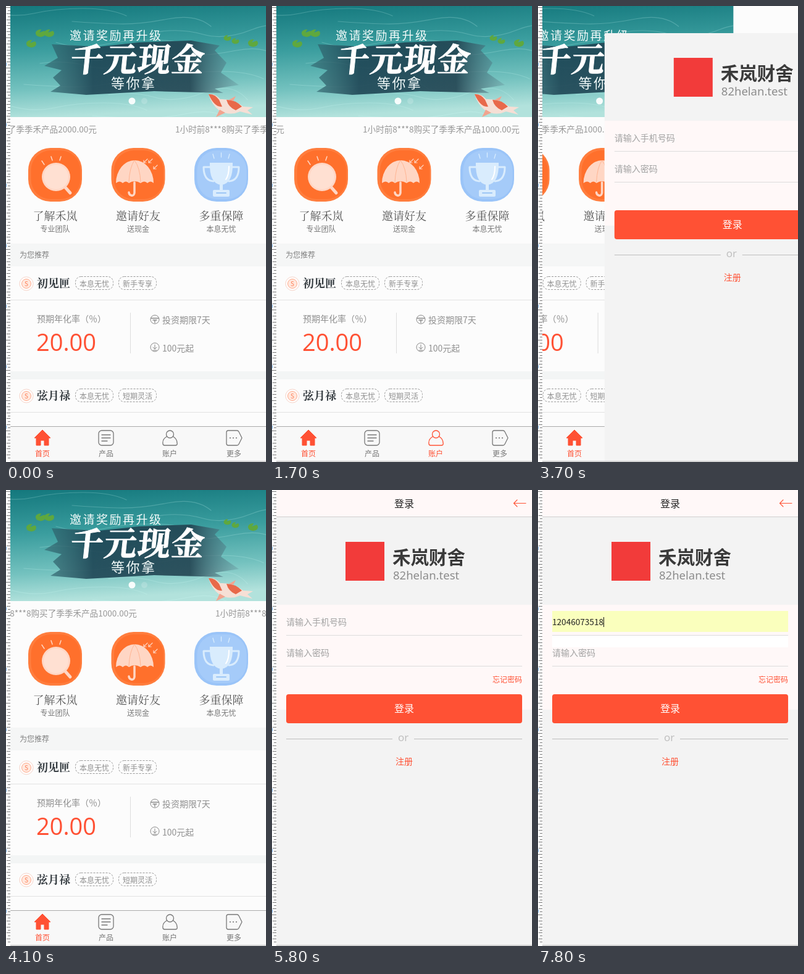
Write an HTML page that moves like this. It is 421 px wide and 739 px high and loops after 8 s.

```html
<!DOCTYPE html>
<html lang="zh-CN">
<head>
<meta charset="utf-8">
<style>
html, body { margin: 0; width: 100%; height: 100%; overflow: hidden; background: #fcfcfc; }
svg { display: block; width: 100%; height: 100%; }
text { font-family: "Noto Sans CJK SC", "Noto Sans", sans-serif; white-space: pre; }
.serif { font-family: "Noto Serif CJK SC", "Noto Sans CJK SC", serif; }
.num { font-family: "Open Sans", "Noto Sans", sans-serif; }
.mid { text-anchor: middle; }
</style>
</head>
<body>
<svg id="stage" viewBox="0 0 421 739"></svg>
<script>
const RED = '#ff5134', GREY = '#8f8f8f', PEACH = '#ffd6c4', ICE = '#d9ecfd';

const text = (x, y, size, fill, str, more = '') =>
  `<text x="${x}" y="${y}" font-size="${size}" fill="${fill}" ${more}>${str}</text>`;
const rect = (x, y, w, h, fill, more = '') =>
  `<rect x="${x}" y="${y}" width="${w}" height="${h}" fill="${fill}" ${more}/>`;
const path = (d, fill, more = '') => `<path d="${d}" fill="${fill}" ${more}/>`;
const line = (d, color, w = 1, more = '') =>
  path(d, 'none', `stroke="${color}" stroke-width="${w}" stroke-linecap="round" stroke-linejoin="round" ${more}`);
const circle = (x, y, r, fill, more = '') => `<circle cx="${x}" cy="${y}" r="${r}" fill="${fill}" ${more}/>`;
const group = (id, body) => `<g id="${id}">${body}</g>`;
const range = (n, fn) => Array.from({ length: n }, (_, i) => fn(i)).join('');

const defs = `<defs>
  <linearGradient id="water" x1="0" y1="0" x2=".12" y2="1">
    <stop offset="0" stop-color="#14787d"/><stop offset=".4" stop-color="#3a9d9e"/>
    <stop offset=".75" stop-color="#74c2bf"/><stop offset="1" stop-color="#b2e2dc"/>
  </linearGradient>
  <linearGradient id="ink">
    <stop offset="0" stop-color="#33666f" stop-opacity=".7"/><stop offset=".25" stop-color="#1c4252"/>
    <stop offset=".75" stop-color="#21414f"/><stop offset="1" stop-color="#5b7f8a" stop-opacity=".3"/>
  </linearGradient>
  <clipPath id="page"><rect x="7" y="0" width="414" height="739"/></clipPath>
  <clipPath id="sea"><rect x="7" y="0" width="414" height="180"/></clipPath>
</defs>`;

function ruler() {
  return rect(0, 0, 7, 739, '#fff') + range(150, i => {
    const y = i * 4.9 + 2, len = i % 10 === 0 ? 7 : i % 2 ? 4 : 6;
    return rect(7 - len, Math.round(y), len, 1, '#777');
  }) + range(7, i => rect(0, 92 + i * 98, 1, 5, '#7db4e8'));
}

function lily(x, y, r) {
  return path(`M${x} ${y}L${x + r} ${y - r * .35}A${r} ${r * .75} 0 1 1 ${x + r * .4} ${y - r * .6}Z`, '#5fa83e');
}

function banner() {
  const ripples = range(11, i => {
    const y = 8 + i * 17, x = (i * 137) % 300 - 30;
    return line(`M${x} ${y}q40 ${12 - i % 3 * 9} 75 4t80 -8t70 12`, '#d5fff8', 1.2, 'opacity=".22"');
  });
  const koi = path('M328 143Q338 141 347 151Q368 150 384 163L400 164L391 169L399 176L379 171Q362 179 345 169Q333 160 328 143Z', '#f6dfd5')
    + path('M328 143Q338 142 345 152L350 163Q338 165 328 143Z', '#e8694a')
    + path('M357 152Q372 152 382 163L372 169Q360 164 357 152Z', '#e8694a')
    + path('M346 168L340 180L355 173ZM361 152L372 146L368 154Z', '#f1a48f');
  return '<g clip-path="url(#sea)">' + rect(7, 0, 414, 180, 'url(#water)') + ripples
    + lily(39, 60, 8) + lily(54, 43, 8) + lily(68, 43, 8) + lily(357, 51, 6) + lily(370, 56, 6) + lily(398, 59, 8)
    + path('M74 62L150 66L215 59L300 56L346 64L338 72L357 92L348 108L377 128L338 134L352 141L240 138L130 144L72 139L88 129L76 116L90 104L62 97L84 84Z', 'url(#ink)', 'opacity=".88"')
    + koi
    + text(103, 55, 19, '#f3fbfa', '邀请奖励再升级', 'letter-spacing="2.5"')
    + text(105, 106, 53, '#fff', '千元现金', 'class="serif" font-weight="900" letter-spacing="1.5" stroke="#fff" transform="translate(9 0) skewX(-6)"')
    + text(170, 133, 22, '#f3fbfa', '等你拿', 'letter-spacing="2.5"')
    + circle(204, 154, 5.5, '#fff', 'opacity=".92"') + circle(224, 154, 5, '#fff', 'opacity=".18"') + '</g>';
}

function badge(cx, outer, inner, art, title, sub) {
  return rect(cx - 43.5, 230, 87, 87, outer, 'rx="36"') + rect(cx - 39, 234, 80, 79, inner, 'rx="32"') + art
    + text(cx, 347, 18, '#555', title, 'class="serif mid"') + text(cx, 366, 12, '#777', sub, 'class="mid"');
}

function badges() {
  const glass = line('M96 294L104 303', PEACH, 5) + circle(81, 277, 23, PEACH)
    + circle(81, 277, 20, '#ffe0d2') + line('M58 251L62 257M73 244L75 250M89 244L87 250', PEACH, 1.5);
  const umbrella = path('M178 287A30.5 37 0 0 1 239 287Q234 282 229 287Q224 282 218 287Q208 281 199 287Q194 282 189 287Q184 282 178 287Z', PEACH)
    + line('M208 286V303Q207 308 203 307Q199 306 199 302', PEACH, 3.5)
    + line('M199 285Q200 262 208 250Q217 262 218 285', '#ffb593', 1)
    + range(3, i => {
      const x = 223 + i * 8, y = i === 2 ? 264 : 254;
      return line(`M${x + 6} ${y - 6}L${x} ${y}M${x} ${y - 4}V${y}H${x + 4}`, PEACH, 1.2);
    });
  const cup = line('M331 261H320Q320 283 336 284M366 261H377Q377 283 361 284', ICE, 3)
    + path('M330 254H367Q368 288 348.5 290Q329 288 330 254Z', ICE)
    + rect(346, 288, 5, 11, ICE) + rect(335, 298, 27, 11, ICE, 'rx="2"')
    + line('M341 303H356', '#9cc6f5', 2) + line('M361 260Q361 274 356 281', '#fff', 2)
    + line('M335 240L337 247M348.5 238V245M362 240L360 247', ICE, 1.3);
  return badge(79.5, '#ff7d3d', '#ff702c', glass, '了解禾岚', '专业团队')
    + badge(214, '#ff7d3d', '#ff702c', umbrella, '邀请好友', '送现金')
    + badge(348.5, '#9ac4f8', '#a5cbf9', cup, '多重保障', '本息无忧');
}

function pill(x, y, str) {
  return rect(x + .5, y - 11.5, 61, 21, 'none', 'rx="9" stroke="#999" stroke-dasharray="3 2"')
    + text(x + 31, y + 5, 12, GREY, str, 'class="mid"');
}

function product(y, name, tag) {
  return circle(33, y, 11, '#fff', 'stroke="#f6d3c8"') + circle(33, y, 7.5, '#ffe9df', 'stroke="#ffa98b"')
    + text(33, y + 4, 10, '#ff7f57', 'S', 'class="mid"')
    + text(50, y + 6, 18, '#333a3f', name, 'class="serif" font-weight="700"')
    + pill(112, y, '本息无忧') + pill(182, y, tag) + rect(7, y + 26, 414, 1, '#e2e2e2');
}

function tab(cx, label, icon, id, color = '#777') {
  return `<g id="${id}" color="${color}">${icon}${text(cx, 730, 12, 'currentColor', label, 'class="mid"')}</g>`;
}

function tabs() {
  const cc = 'currentColor';
  return rect(7, 682, 414, 55, '#f8f8f8') + rect(7, 681, 414, 1, '#aaa')
    + tab(59, '首页', path('M59 687L72 700H69V712H62V704H56V712H49V700H46Z', cc, 'stroke="currentColor" stroke-linejoin="round"'), 'home-tab', RED)
    + tab(162, '产品', rect(150, 688, 24, 24, 'none', 'rx="5" stroke="currentColor" stroke-width="1.3"')
      + line('M155 695H169M155 700H169M155 705H164', cc, 1.3), 'product-tab')
    + tab(265, '账户', circle(265.5, 694, 6, 'none', 'stroke="currentColor" stroke-width="1.3"')
      + line('M260 698Q253 702 254 709Q254 712 257 712H274Q278 712 277 708Q277 702 271 698', cc, 1.3), 'account-tab')
    + tab(369, '更多', line('M360 688H374Q376 688 377 690L382 700L377 710Q376 712 374 712H360Q357 712 357 709V691Q357 688 360 688Z', cc, 1.3)
      + range(3, i => circle(363 + i * 5, 700, 1.1, cc)), 'more-tab');
}

function home() {
  return rect(7, 0, 414, 739, '#fcfcfc') + banner()
    + `<g clip-path="url(#page)">${group('ticker', '')}</g>` + badges()
    + rect(7, 385, 414, 37, '#f5f6f6') + text(22, 408, 12, '#808080', '为您推荐')
    + product(450, '初见匣', '新手专享')
    + text(50, 512, 14, GREY, '预期年化率（％）') + text(49, 559, 38, RED, '20.00', 'class="num"')
    + rect(201, 497, 1, 66, '#ddd')
    + circle(241, 508, 7, 'none', 'stroke="#888"') + line('M235 506H247M238 509H244M241 509V513', '#888', 1.4)
    + text(253, 514, 14, GREY, '投资期限7天')
    + circle(241, 553, 7, 'none', 'stroke="#888"') + line('M241 549V556M238 553L241 556L244 553M238 558H244', '#888')
    + text(253, 560, 14, GREY, '100元起')
    + rect(7, 592, 414, 13, '#f3f5f5') + product(632, '弦月禄', '短期灵活');
}

const PHONE = '12046073518';
const saved = [PHONE, '12046073529', '12088240160', '12071936604', '12059320847', '12093415072'];

function bar() {
  return rect(7, 0, 414, 43, '#fbfbfb', 'class="panel"') + rect(7, 43, 414, 1, '#d0d0d0')
    + group('title', text(214, 28, 16, '#222', '登录', 'class="mid"'))
    + line('M411 21.5H391.5L397 16M391.5 21.5L397 27', RED, 1.1);
}

function form() {
  return rect(7, 44, 414, 695, '#f3f3f3')
    + rect(119, 84, 63, 63, '#f23b3a')
    + text(195, 120, 29.5, '#3a3a3a', '禾岚财舍', 'font-weight="700"')
    + text(196, 145, 18.5, '#8c8c8c', '82helan.test', 'style="font-family:\'Noto Sans\',sans-serif"')
    + rect(7, 186, 414, 170, '#fcfcfc', 'class="panel"')
    + rect(23, 236, 382, 19, '#fff', 'id="strip"')
    + rect(23, 196, 382, 34, '#faffbd', 'id="fill"')
    + text(23, 219, 14, '#a2a2a2', '请输入手机号码', 'id="hint"')
    + text(23, 219, 13.6, '#222', '', 'id="typed"') + rect(23, 206, 1, 16, '#111', 'id="caret"')
    + rect(23, 235, 382, 1, '#dcdcdc') + text(23, 269, 14, '#a2a2a2', '请输入密码') + rect(23, 285, 382, 1, '#dcdcdc')
    + text(357, 312, 12, RED, '忘记密码')
    + rect(23, 331, 382, 47, RED, 'rx="4"') + text(214, 360, 16, '#fff', '登录', 'class="mid"')
    + rect(23, 403, 172, 1, '#bdbdbd') + rect(230, 403, 175, 1, '#bdbdbd')
    + text(212.5, 407, 17, '#bdbdbd', 'or', 'class="num mid"')
    + text(214, 445, 14, RED, '注册', 'class="mid"')
    + group('list', rect(23.5, 231.5, 381, 144, '#fff', 'stroke="#c4c4c4"')
      + rect(24, 232, 380, 23, '#e6e6e6', 'id="pick"')
      + saved.map((n, i) => text(28, 248 + i * 24, 12.4, '#333', n)).join(''));
}

document.getElementById('stage').innerHTML = defs + ruler() + '<g clip-path="url(#page)">'
  + group('home', home()) + group('tabs', tabs()) + group('form', form()) + group('bar', bar())
  + rect(7, 737, 414, 2, '#d3d3d3') + '</g>';

const $ = id => document.getElementById(id);
const show = (id, on) => { $(id).style.display = on ? '' : 'none'; };
const shift = (id, x) => $(id).setAttribute('transform', `translate(${x.toFixed(1)} 0)`);
const news = amount => `1小时前8***8购买了季季禾产品${amount}元`;
$('ticker').innerHTML = text(-381, 205, 13.6, '#979797', news('2000.00'), 'id="older"')
  + text(0, 205, 13.6, '#979797', news('1000.00'));

// cubic-bezier(.36, .66, .04, 1)
function ease(p) {
  if (p <= 0 || p >= 1) return p <= 0 ? 0 : 1;
  const at = (s, a, b) => 3 * s * (1 - s) ** 2 * a + 3 * s * s * (1 - s) * b + s ** 3;
  let lo = 0, hi = 1;
  for (let i = 0; i < 20; i++) {
    const s = (lo + hi) / 2;
    if (at(s, .36, .04) < p) lo = s; else hi = s;
  }
  return at(lo, .66, 1);
}

const OPEN = 1800, BACK = 3700, REOPEN = 5400;
const slide = (t, start) => ease((t - start + 50) / 450);

function draw(time) {
  const t = Math.floor(time / 100) * 100;
  const again = t >= BACK;
  const inLogin = t >= REOPEN || (t >= OPEN && t < BACK);

  // 0 shows the home page, 1 the login page
  const pos = t < OPEN ? 0 : t < BACK ? slide(t, OPEN) : t < REOPEN ? 1 - slide(t, BACK) : slide(t, REOPEN);
  show('form', pos > 0);
  show('home', pos < 1);
  show('bar', inLogin);
  show('tabs', !inLogin);
  shift('form', (1 - pos) * 414);
  shift('home', -pos * 414 / 3);
  shift('title', (1 - pos) * 150);
  $('title').style.opacity = pos;

  shift('ticker', again ? 339 - (t - 4100) * .0717 : 274 - t * .0747);
  $('older').textContent = news(again ? '1000.00' : '2000.00');
  $('account-tab').setAttribute('color', t >= (again ? REOPEN : OPEN) - 100 ? RED : '#777');

  document.querySelectorAll('.panel').forEach(p =>
    p.setAttribute('fill', again ? '#fff8f8' : '#fcfcfc'));

  const chosen = t >= 7500;
  const typed = chosen ? PHONE : t >= 7000 ? PHONE[0] : '';
  $('typed').textContent = typed;
  $('caret').setAttribute('x', chosen ? 106 : typed ? 31 : 23);
  show('caret', (t >= 6400 && t < 6900) || (t >= 7000 && t < 7500) || t >= 7800);
  show('hint', !typed);
  show('fill', chosen);
  show('list', t >= 7100 && t < 7700);
  show('pick', chosen);
  show('strip', t >= 7700);
}

function tick(now) {
  draw(now % 8000);
  requestAnimationFrame(tick);
}
draw(0);
requestAnimationFrame(tick);
</script>
</body>
</html>
```
